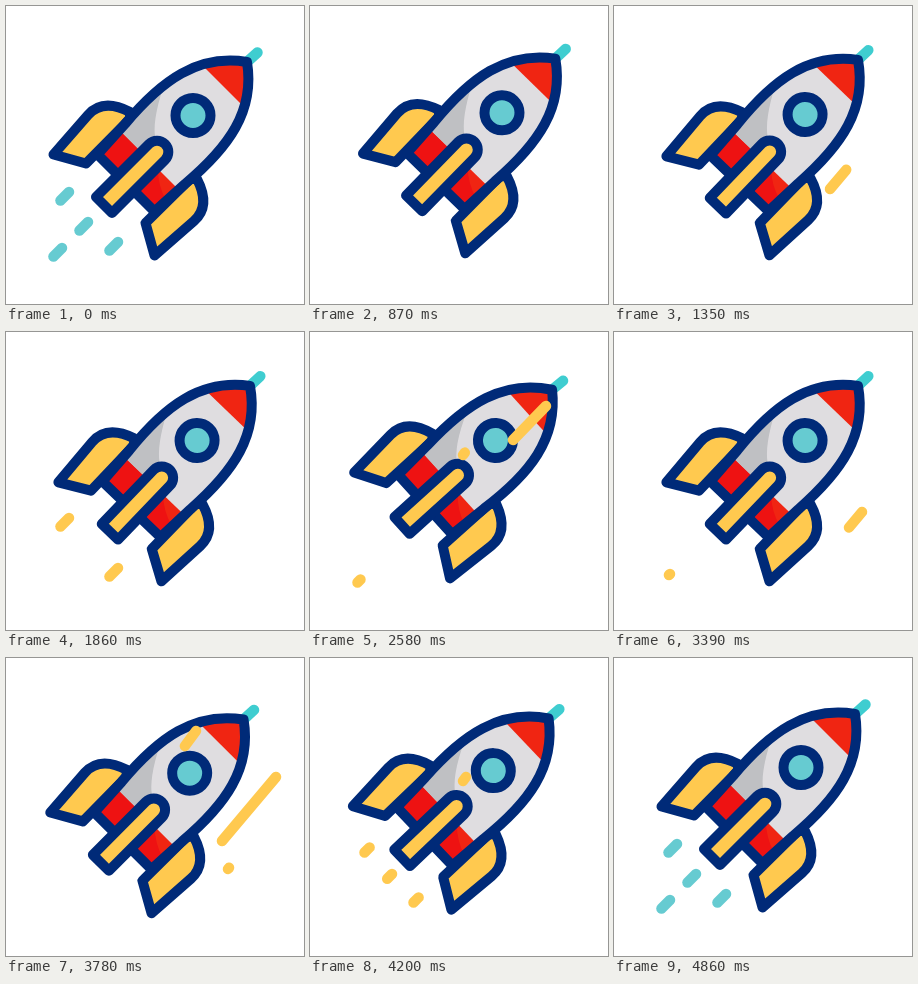
These frames come from a looping animation (298 by 298 pixels, 5.28 s). An HTML page:

```html
<!DOCTYPE html>
<html lang="en">
<head>
<meta charset="utf-8">
<title>Rocket</title>
<style>
  html, body { margin: 0; width: 100%; height: 100%; overflow: hidden; background: #fff; }
  svg { display: block; width: 100vw; height: 100vh; }
  .line { stroke: #002a78; stroke-width: 10; stroke-linejoin: round; stroke-linecap: round; }
  .dash { fill: none; stroke-width: 10.5; stroke-linecap: round; }
</style>
</head>
<body>
<svg viewBox="0 0 298 298">
  <defs>
    <path id="body" d="M91.500 148.500 L119 118 C156 74 192 48 241 56 C249 105 223 141 179 178 L148.500 205.500 Z"/>
    <path id="fin" d="M47.500 148.500 L82 109 Q97 92 124 106 V113 L80 157.500 Z"/>
    <clipPath id="hull"><use href="#body"/></clipPath>
  </defs>
  <g id="rocket">
    <path class="dash" stroke="#3fcdd0" d="M241 56 L251.500 46.500"/>
    <g class="line" fill="#ffc94f">
      <use href="#fin"/>
      <use href="#fin" transform="matrix(0 -1 -1 0 297 297)"/>
    </g>
    <g clip-path="url(#hull)">
      <path fill="#dfdde0" d="M80 40 H260 V220 H80 Z"/>
      <path fill="#bfc0c3" d="M80 60 H165 Q146 108 149 130 Q148 155 154 170 H80 Z"/>
      <path fill="#f02512" d="M102 113 L184 195 L148 225 L72 149 Z"/>
      <path fill="#ee1212" d="M102 113 L152 163 Q152 180 160 194 L148 225 L72 149 Z"/>
      <path fill="#f02512" d="M190 53 L244 107 L260 40 Z"/>
    </g>
    <use href="#body" class="line" fill="none"/>
    <circle class="line" cx="187" cy="109.500" r="17.500" fill="#66cbd1"/>
    <path class="line" fill="#ffc94f" d="M90 191 L143 138 A11.300 11.300 0 0 1 159 154 L106 207 Z"/>
  </g>
  <g id="dashes"></g>
</svg>
<script>
const LOOP = 5280, STEP = 30;
const TEAL = '#66cbd1', GOLD = '#ffc94f';
const rocket = document.getElementById('rocket');
const layer = document.getElementById('dashes');
const clamp = v => Math.min(1, Math.max(0, v));
const ramp = (t, from, to) => clamp((t - from) / (to - from));
const smooth = k => k * k * (3 - 2 * k);

// Elliptical shake, faded in and out
function shake(t) {
  const swing = peak => Math.cos(2 * Math.PI * (t - 330 - peak) / 510);
  const fade = smooth(ramp(t, 600, 900)) * (1 - smooth(ramp(t, 4110, 4350)));
  const x = 5.5 * swing(60);
  const y = 0.5 - 5.5 * swing(105);
  const turn = 0.8 + 2.1 * swing(225);
  return [x, y, turn].map(v => v * fade);
}

function addDash(color, x, y, dx, dy) {
  const el = document.createElementNS('http://www.w3.org/2000/svg', 'path');
  el.setAttribute('class', 'dash');
  el.setAttribute('stroke', color);
  layer.append(el);
  return (tail, head) => {
    const at = k => `${x + dx * k} ${y + dy * k}`;
    const shown = head > 0 && tail < 1;
    el.setAttribute('d', shown ? `M${at(tail)} L${at(head)}` : '');
  };
}

// A line that grows from its upper end, then shrinks to its lower end
function addStreak(line, span, first, every = LOOP) {
  const trim = addDash(GOLD, ...line);
  return t => {
    const since = t - first;
    const begun = since >= 0 && t - since % every < 4400;
    const p = begun ? (since % every) / span : 0;
    trim(clamp(p * 2 - 1), clamp(p / 0.4));
  };
}

const exhaust = [[63, 186], [112, 236], [82, 216], [56, 242]].map(p => [...p, -8.5, 8.5]);
const firstPuff = [1680, 1680, 1870, 2250];
const resting = exhaust.map(line => addDash(TEAL, ...line));
const streaks = [
  ...exhaust.map((line, i) => addStreak(line, 400, firstPuff[i], 1120)),
  addStreak([270, 119, -54, 64], 500, 925, 2630),
  addStreak([236, 74, -33, 34], 720, 2292),
  addStreak([190, 73, -37, 50], 500, 2092, 1628),
  addStreak([248, 180, -26, 31], 500, 3290),
  addStreak([226, 66, -28, 29], 500, 4355)
];

function draw(t) {
  const [x, y, turn] = shake(t);
  rocket.setAttribute('transform', `translate(${x} ${y}) rotate(${turn} 187 109)`);
  const ending = t > LOOP / 2;
  const tail = ending ? 0 : ramp(t, 480, 720);
  const head = ending ? ramp(t, 4500, 4740) : 1;
  resting.forEach(trim => trim(tail, head));
  streaks.forEach(play => play(t));
}

function tick() {
  const t = performance.now() % LOOP;
  draw(Math.floor(t / STEP) * STEP);
  requestAnimationFrame(tick);
}
tick();
</script>
</body>
</html>
```
